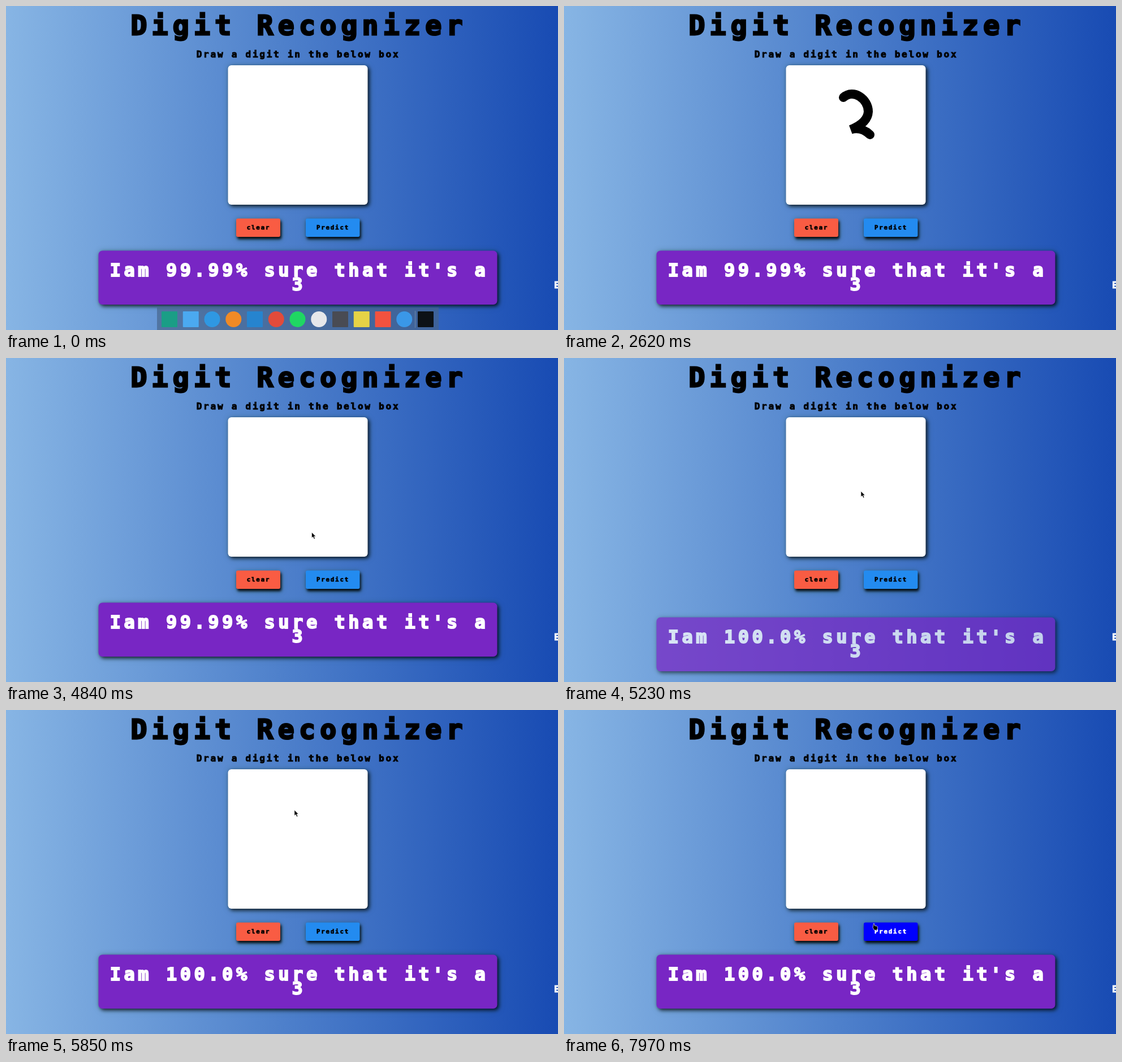
An HTML page that plays this animation: 976x574 px, repeating every 8 s.

```html
<!DOCTYPE html>
<html lang="en">
<head>
<meta charset="utf-8">
<title>Digit Recognizer</title>
<style>
  html, body { margin: 0; width: 100%; height: 100%; overflow: hidden; }
  body { background: linear-gradient(90deg, #87b5e4, #4e80cb 50%, #184bb3); }
  svg { display: block; width: 976px; height: 574px; }
  text {
    font: bold 16px "DejaVu Sans Mono", "Liberation Mono", monospace;
    letter-spacing: .173em; text-anchor: middle;
    stroke-width: .06em; stroke: currentColor; fill: currentColor; color: #000;
  }
  .title { font-size: 48px; }
  .result text { font-size: 32px; color: #fff; }
  .button text { font-size: 10.67px; }
  .panel { filter: drop-shadow(3px 3px 3px #000b) drop-shadow(0 0 5px #0424); }
  .button rect { filter: drop-shadow(2px 4px 2px #000d) drop-shadow(0 1px 4px #0426); }
  .pen { fill: none; stroke: #000; stroke-width: 16; stroke-linecap: round; }
  .hover rect { fill: #00f; }
  .hover text { color: #fff; }
</style>
</head>
<body>
<svg viewBox="0 0 976 574">
  <g class="words">
    <text class="title" x="518" y="50.500">Digit Recognizer</text>
    <text x="516.500" y="91">Draw a digit in the below box</text>
    <text x="969" y="499.500" style="text-anchor:start;color:#fff">E</text>
  </g>
  <rect class="panel" x="392.500" y="105" width="247" height="247" rx="6" fill="#fff"/>
  <path class="pen" id="two" pathLength="1" d="M494 162C512 146 538 165 538 187Q537 207 507 219Q525 213 541 228"/>
  <path class="pen" id="one" pathLength="1" d="M507 163Q503 220 508 275"/>
  <g class="button">
    <rect x="407" y="376.500" width="78" height="32.500" rx="3" fill="#f95c43"/>
    <text class="words" x="446.500" y="396">clear</text>
  </g>
  <g class="button" id="predict">
    <rect x="530" y="376.500" width="95.500" height="32.500" rx="3" fill="#238bf0"/>
    <text class="words" x="578" y="396">Predict</text>
  </g>
  <g class="result" id="result">
    <rect class="panel" x="163.500" y="433.500" width="705" height="95.500" rx="7" fill="#7826c4"/>
    <g class="words">
      <text id="message" x="518.500" y="479"></text>
      <text x="518" y="503.500">3</text>
    </g>
  </g>
  <g id="dock"><path d="M267 534H765V574H267Z" fill="#456387" opacity=".65"/></g>
  <g id="cursor" stroke="#fff" stroke-width=".7">
    <path id="arrow" d="M0 0V10L2.400 8L4.200 12L6 11.200L4.300 7.300H7.300Z"/>
    <path id="hand" d="M1.500 0Q3 0 3 1.500V4L7.500 5Q9 6 8.500 8L7.500 12H2.500L0 7.500Z"/>
  </g>
</svg>
<script>
const $ = id => document.getElementById(id);
const LOOP = 8000, RELOAD = 4910, FONT_READY = 4970;

// key points of the pointer: time, x, y
const route = [
  [2660, 543, 229], [2940, 541, 262], [3220, 476, 274], [3800, 478, 288],
  [4140, 570, 386], [4320, 570, 386], [4840, 540.5, 309], [5230, 525, 236],
  [5970, 507, 166], [6770, 508, 279], [7500, 554, 387], [7970, 546, 378]
];

const icons = `square #1a9e86, square #4ba9f0, round #2f98e2, round #f08a26, square #2684cf,
  round #e24b3b, round #1fd663, round #e6e7ea, square #494b53, square #e6d346,
  square #f2523f, round #3a97e8, square #0c1116`.split(",");
$("dock").innerHTML += icons.map((icon, i) => {
  const [shape, color] = icon.trim().split(" ");
  const radius = shape === "round" ? 14 : 1;
  return `<rect x="${275 + i * 37.75}" y="541" width="28" height="28" rx="${radius}" fill="${color}"/>`;
}).join("") + '<path d="M723.500 540V570" stroke="#6d87a8"/>';

const span = (t, from, to) => Math.min(1, Math.max(0, (t - from) / (to - from)));
const ease = k => 1 - (1 - k) ** 2.3;
const show = (el, on) => { el.style.visibility = on ? "visible" : "hidden"; };
const move = (id, x, y) => $(id).setAttribute("transform", `translate(${x} ${y})`);

function pointer(t) {
  const next = route.findIndex(p => p[0] > t);
  const i = next < 0 ? route.length - 1 : Math.max(1, next);
  const [t0, x0, y0] = route[i - 1], [t1, x1, y1] = route[i];
  const k = span(t, t0, t1);
  return [x0 + (x1 - x0) * k, y0 + (y1 - y0) * k];
}

function draw(id, t, from, to, cleared) {
  show($(id), t >= from && t < cleared);
  $(id).setAttribute("stroke-dasharray", `${span(t, from, to)} 2`);
}

function render(t) {
  move("dock", 0, ease(span(t, 1310, 1600)) * 42);
  draw("two", t, 1600, 2520, 4100);
  draw("one", t, 5970, 6770, 7640);

  // the reloaded page brings in its answer from below
  const fresh = t >= RELOAD;
  const rise = fresh ? ease(span(t, 4800, 5800)) : 1;
  move("result", 0, (1 - rise) * 95.5);
  $("result").setAttribute("opacity", rise);
  $("message").textContent = `Iam ${fresh ? "100.0" : "99.99"}% sure that it's a`;
  document.querySelectorAll(".words").forEach(el => show(el, !fresh || t >= FONT_READY));

  const [x, y] = pointer(t);
  const visible = t >= route[0][0];
  const over = visible && x >= 530 && x <= 626 && y >= 377 && y <= 409;
  move("cursor", x, y);
  show($("arrow"), visible && !over);
  show($("hand"), over);
  $("predict").classList.toggle("hover", over);
}

const start = performance.now();
function tick() {
  render((performance.now() - start) % LOOP);
  requestAnimationFrame(tick);
}
tick();
</script>
</body>
</html>
```
